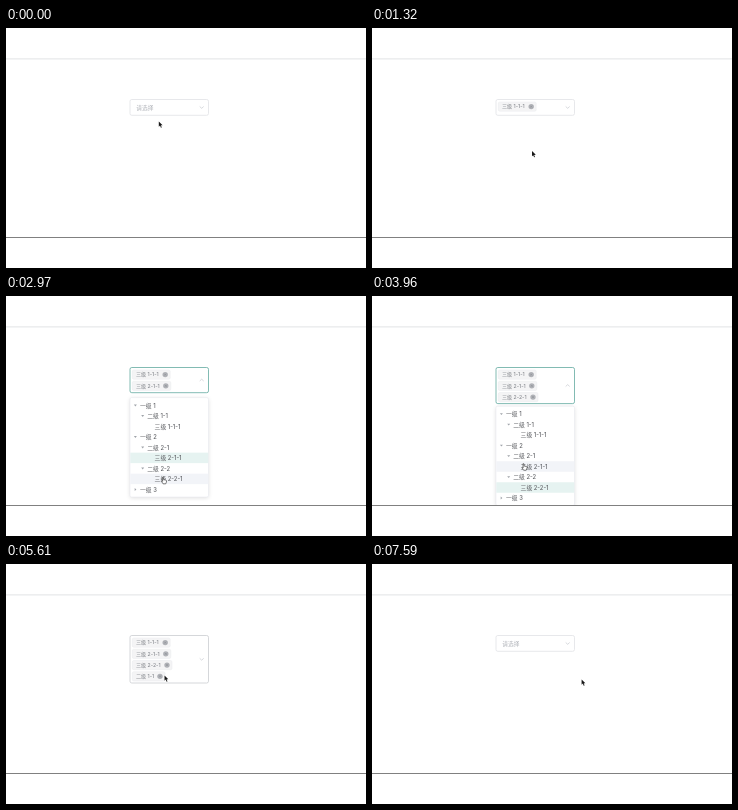
An HTML page with a canvas that plays this animation: 360 px wide and 240 px high, repeating every 7.92 s.

```html
<!DOCTYPE html>
<html lang="zh-CN">
<head>
<meta charset="utf-8">
<title>树形多选</title>
<style>
  html, body { margin: 0; width: 100%; height: 100%; overflow: hidden; background: #fff; }
  canvas { display: block; width: 360px; height: 240px; }
</style>
</head>
<body>
<canvas id="stage"></canvas>
<script>
const canvas = document.getElementById('stage');
const ctx = canvas.getContext('2d');
const dpr = window.devicePixelRatio || 1;
canvas.width = 360 * dpr;
canvas.height = 240 * dpr;

const STEP = 330, LOOP = 7920;
const FONT = 'Inter, "Noto Sans CJK SC", "Noto Sans CJK", "Noto Sans CJK JP", sans-serif';
const LEFT = 124, RIGHT = 202.5, TOP = 71.5;
const ROW = 10.5;

// [label, level]
const ROWS = [
  ['一级 1', 0], ['二级 1-1', 1], ['三级 1-1-1', 2],
  ['一级 2', 0], ['二级 2-1', 1], ['三级 2-1-1', 2],
  ['二级 2-2', 1], ['三级 2-2-1', 2], ['一级 3', 0]
];
const TAGS = [2, 5, 7, 1].map(i => ROWS[i][0]);
const TAG_ENDS = [164.2, 164.8, 166, 159];
const BOX_BOTTOM = [87.3, 87.3, 96.7, 107.6, 119];
const MENU_TOP = [92.8, 92.8, 101.6, 110.2, 121];
const BORDER = { idle: '#e1e3e6', hover: '#cbcdd1', focus: '#62aaa0' };

// Each step: tags, border, cursor shape, cursor x, y, then menu: selected row, hovered row, scale
const STATES = [
  [0, 'idle', 'arrow', 152.8, 93.4],
  [0, 'hover', 'hand', 157, 80],
  [0, 'focus', 'hand', 159, 112, 7, 1, 1],
  [0, 'focus', 'hand', 161, 126, 7, 2, 1],
  [1, 'idle', 'arrow', 160, 123],
  [1, 'focus', 'hand', 159, 84, 2, -1, 0.93],
  [1, 'focus', 'hand', 160, 155, 2, 5, 1],
  [2, 'idle', 'arrow', 159, 152],
  [2, 'focus', 'hand', 157, 93, 5, -1, 0.98],
  [2, 'focus', 'hand', 158, 184.6, 5, 7, 1],
  [3, 'idle', 'arrow', 156, 182],
  [3, 'hover', 'hand', 155, 92],
  [3, 'focus', 'hand', 152.5, 171, 7, 5, 1],
  [3, 'focus', 'arrow', 155, 112, 7, -1, 1],
  [3, 'focus', 'hand', 156, 101, 7, -1, 1],
  [3, 'focus', 'hand', 156, 130, 7, 1, 1],
  [4, 'idle', 'arrow', 157, 126],
  [4, 'hover', 'arrow', 158.5, 111.4],
  [3, 'hover', 'arrow', 158.5, 111.4],
  [3, 'hover', 'arrow', 159, 100],
  [2, 'hover', 'arrow', 158.5, 88.5],
  [1, 'hover', 'arrow', 158.5, 77.5],
  [0, 'hover', 'arrow', 166, 83],
  [0, 'idle', 'arrow', 209.6, 115.4]
];

function box(x, y, w, h, r, fill, stroke, width = 0.8) {
  ctx.beginPath();
  ctx.roundRect(x, y, w, h, r);
  if (fill) { ctx.fillStyle = fill; ctx.fill(); }
  if (stroke) { ctx.strokeStyle = stroke; ctx.lineWidth = width; ctx.stroke(); }
}

function text(str, x, y, size, color) {
  ctx.font = `500 ${size}px ${FONT}`;
  ctx.textBaseline = 'alphabetic';
  ctx.fillStyle = color;
  ctx.fillText(str, x, y + size * 0.37);
}

function path(points, x, y, scale = 1) {
  ctx.beginPath();
  points.forEach(([px, py], i) => {
    const at = [x + px * scale, y + py * scale];
    i ? ctx.lineTo(...at) : ctx.moveTo(...at);
  });
}

function chevron(y, open) {
  const d = open ? -1 : 1;
  path([[-2, -0.9 * d], [0, 0.9 * d], [2, -0.9 * d]], 195.7, y);
  ctx.strokeStyle = '#c6c9ce';
  ctx.lineWidth = 0.7;
  ctx.stroke();
}

function caret(x, y, open) {
  path(open ? [[-1.5, -0.8], [1.5, -0.8], [0, 1]] : [[-0.7, -1.5], [1, 0], [-0.7, 1.5]], x, y);
  ctx.closePath();
  ctx.fillStyle = '#a0a4aa';
  ctx.fill();
}

function tag(i) {
  const y = 78.6 + i * 11.25, end = TAG_ENDS[i];
  box(126.3, y - 4.6, end - 126.3, 9.2, 1.5, '#f4f4f5', '#e9eaec', 0.5);
  text(TAGS[i], 130, y, 5.1, '#85888e');
  ctx.beginPath();
  ctx.arc(end - 5, y, 2.7, 0, Math.PI * 2);
  ctx.fillStyle = '#b0b2b7';
  ctx.fill();
  path([[-1, -1], [1, 1]], end - 5, y);
  ctx.moveTo(end - 4, y - 1);
  ctx.lineTo(end - 6, y + 1);
  ctx.strokeStyle = '#85888e';
  ctx.lineWidth = 0.5;
  ctx.stroke();
}

function select(count, border, open) {
  const bottom = BOX_BOTTOM[count];
  box(LEFT, TOP, RIGHT - LEFT, bottom - TOP, 1.8, '#fff', BORDER[border]);
  for (let i = 0; i < count; i++) tag(i);
  if (!count) text('请选择', 130.3, 79.5, 5.7, '#b0b3b9');
  chevron((TOP + bottom) / 2, open);
}

function menu(top, selected, hovered, scale) {
  ctx.save();
  ctx.beginPath();
  ctx.rect(0, 0, 360, 209);
  ctx.clip();
  ctx.translate(0, top);
  ctx.scale(1, scale);
  ctx.shadowColor = 'rgba(0,0,0,0.13)';
  ctx.shadowBlur = 4 * dpr;
  ctx.shadowOffsetY = dpr;
  box(LEFT, 0, RIGHT - LEFT, 99.4, 1.6, '#fff');
  ctx.shadowColor = 'transparent';
  box(LEFT, 0, RIGHT - LEFT, 99.4, 1.6, null, '#e4e7ed', 0.5);
  ROWS.forEach(([label, level], i) => {
    const y = 7.8 + i * ROW;
    if (i === selected || i === hovered) {
      ctx.fillStyle = i === selected ? '#e6f3f1' : '#f2f4f8';
      ctx.fillRect(LEFT + 0.3, y - ROW / 2, RIGHT - LEFT - 0.6, ROW);
    }
    if (level < 2) caret(129.4 + level * 7.3, y, i < 8);
    text(label, 134 + level * 7.3, y, 5.8, '#606266');
  });
  ctx.restore();
}

function arrow(x, y) {
  path([[0, 0], [0, 6], [1.4, 4.8], [2.4, 7.2], [3.4, 6.8], [2.4, 4.5], [4.3, 4.4]], x, y, 0.88);
  ctx.closePath();
  ctx.lineJoin = 'round';
  ctx.strokeStyle = '#fff';
  ctx.lineWidth = 0.8;
  ctx.stroke();
  ctx.fillStyle = '#181818';
  ctx.fill();
}

function hand(x, y) {
  path([[-1.7, -3.6], [-0.7, -3.6], [-0.3, -1], [2.1, -0.6], [2.9, 0.3],
        [2.5, 2.2], [1.9, 3.6], [-1, 3.6], [-2.8, 0.9], [-2.5, 0.1], [-1.4, 0.8]], x, y, 0.9);
  ctx.closePath();
  ctx.lineJoin = 'round';
  ctx.fillStyle = '#fff';
  ctx.fill();
  ctx.strokeStyle = '#333';
  ctx.lineWidth = 0.65;
  ctx.stroke();
}

function draw(time) {
  const [count, border, shape, x, y, selected, hovered, scale] =
    STATES[Math.floor((time % LOOP) / STEP)];
  const open = scale !== undefined;
  ctx.setTransform(dpr, 0, 0, dpr, 0, 0);
  ctx.fillStyle = '#fff';
  ctx.fillRect(0, 0, 360, 240);
  ctx.fillStyle = '#e2e3e5';
  ctx.fillRect(0, 30.4, 360, 1);
  select(count, border, open);
  if (open) menu(MENU_TOP[count], selected, hovered, scale);
  ctx.fillStyle = '#808080';
  ctx.fillRect(0, 209, 360, 1);
  (shape === 'hand' ? hand : arrow)(x, y);
}

const start = performance.now();
function tick() {
  draw(performance.now() - start);
  requestAnimationFrame(tick);
}
tick();
</script>
</body>
</html>
```
